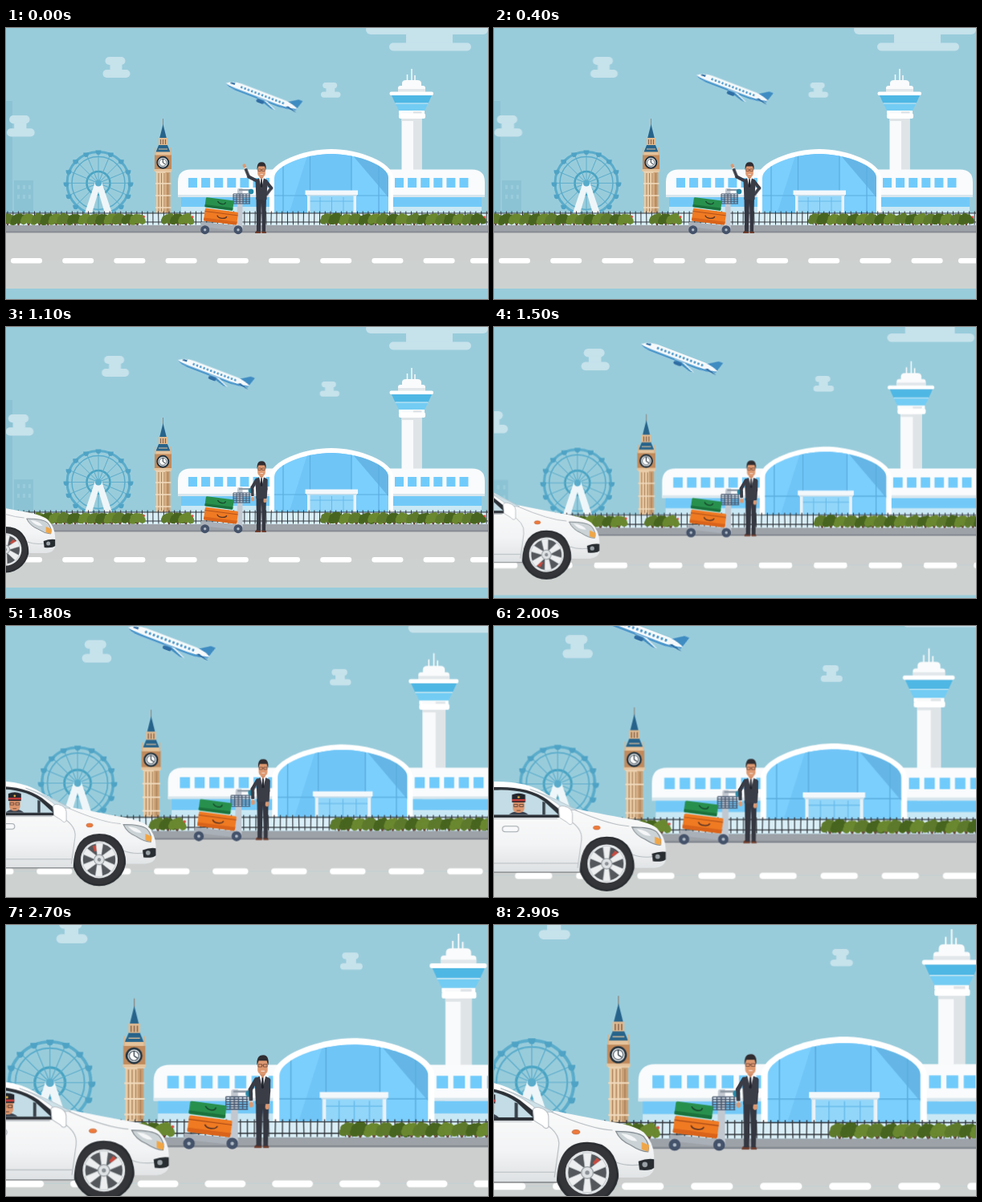
These frames come from a looping animation (600x338 px, 3000 ms). An HTML page:

```html
<!DOCTYPE html>
<html lang="en">
<head>
<meta charset="utf-8">
<title>Airport pickup</title>
<style>
@property --x { syntax: "<number>"; inherits: true; initial-value: 0; }
html, body { margin: 0; width: 100%; height: 100%; overflow: hidden; background: #99ccdb; }
svg { display: block; width: 600px; height: 338px; }
#cam, #plane, #car, .drift, .upper, .fore { animation: 3s linear infinite; }

#cam { animation-name: zoom; }
@keyframes zoom {
  0%, 40% { transform: translate(0, 0) scale(1); }
  43.33% { transform: translate(-4.4px, -2.7px) scale(1.015); }
  50% { transform: translate(-18.6px, -11.6px) scale(1.065); }
  66.67% { transform: translate(-57px, -32.4px) scale(1.185); }
  80% { transform: translate(-77.6px, -45px) scale(1.25); }
  96.67% { transform: translate(-107px, -63px) scale(1.34); }
  100% { transform: translate(-113px, -67px) scale(1.358); }
}

#plane { animation-name: fly; }
@keyframes fly {
  40% { transform: translate(-65px, -30px); }
  100% { transform: translate(-180px, -78px); }
}

/* Clouds are far away, so they grow less than the rest. */
.drift { animation-name: drift; transform-box: fill-box; transform-origin: center; }
@keyframes drift {
  40% { transform: translateX(-1.5px) scale(1); }
  100% { transform: translateX(-1.5px) scale(.85); }
}

#car { animation-name: drive; transform: translateX(calc(var(--x) * 1px)); }
#wheel { transform: translate(166.5px, 277.5px) rotate(calc(var(--x) * 2.12deg)); }
@keyframes drive {
  0%, 24% { --x: -240; }
  36.67% { --x: -167.5; }
  50% { --x: -88; }
  56.67% { --x: -48; }
  60% { --x: -28; }
  63.33% { --x: -11; }
  66.67%, 100% { --x: 0; }
}

.left .upper { animation-name: raise; }
.left .fore { animation-name: wave; }
.right .upper { animation-name: hip; }
.right .fore { animation-name: bend; }
@keyframes raise {
  0%, 25% { transform: rotate(117deg); }
  34%, 100% { transform: rotate(30deg); }
}
@keyframes wave {
  0%, 13.33% { transform: translateY(11px) rotate(41deg); }
  6.67%, 20%, 25% { transform: translateY(11px) rotate(63deg); }
  34%, 100% { transform: translateY(11px) rotate(-32deg); }
}
@keyframes hip {
  0%, 25% { transform: rotate(-38deg); }
  34%, 100% { transform: rotate(0deg); }
}
@keyframes bend {
  0%, 25% { transform: translateY(11px) rotate(75deg); }
  34%, 100% { transform: translateY(11px) rotate(4deg); }
}
</style>
</head>
<body>
<svg viewBox="0 0 600 338">
<defs>
  <linearGradient id="paint" x2="0" y2="1">
    <stop offset="0" stop-color="#fff"/><stop offset=".7" stop-color="#f3f4f5"/><stop offset="1" stop-color="#dfe2e4"/>
  </linearGradient>
  <clipPath id="hall"><path d="M334 232V187C334 171 374 157 405 157S476 171 476 187V232Z"/></clipPath>
  <clipPath id="pane"><path d="M20 200H51Q83 199 101 212L116 226H20Z"/></clipPath>
</defs>
<g id="cam">
  <path fill="#8cc3d4" d="M0 91H8V230H0ZM10 190H34V230H10Z"/>
  <g id="panes" fill="#99ccdb"></g>

  <g id="clouds" fill="#c6e2eb"></g>

  <g id="plane"><g transform="translate(274 68) rotate(21)">
    <path fill="#3f8cc2" d="M79 -4L92 -12.5H97.5L93 2Z"/>
    <path fill="#f6f9fb" d="M0 1Q7 -5 19 -5.5H78Q89 -4.5 95 -1Q90 4 72 5H14Q4 4.5 0 1Z"/>
    <path fill="#4b97cb" d="M0 1Q6 2.5 20 2.5H70Q86 2 95 -1Q90 4 72 5H14Q4 4.5 0 1Z"/>
    <path fill="#2f6da3" d="M6 -2.5L11 -3.5V-1L5 -.8Z"/>
    <g id="ports" fill="#4b97cb"></g>
    <path fill="#dceaf2" d="M42 3.5H56L70 10H66Z"/>
    <path fill="#3f8cc2" d="M42 4H52L68 10.5L64 10.5Z"/>
    <rect fill="#2f6da3" x="43" y="5" width="10" height="4" rx="2"/>
    <path fill="#2f6da3" d="M83 0L95 3.5H91L80 1.5Z"/>
  </g></g>

  <g id="ferris" fill="none" stroke="#5aaccb" transform="translate(115 193.5)">
    <circle r="39" stroke-width="3"/>
    <circle r="33" stroke-width="1.5"/>
    <circle r="14.5" stroke="#48a3c2" stroke-width="2.5"/>
  </g>
  <path fill="#eef6f9" d="M111 192H119L132 231H123L115 204L107 231H98Z"/>
  <circle cx="115" cy="193.5" r="4" fill="#5aaccb"/>

  <g id="clocktower">
    <path stroke="#8a7a6c" stroke-width=".8" d="M195.5 113V122"/>
    <path fill="#27638a" d="M195.5 120L200 138H191ZM190.5 145H200.5L205 156H186Z"/>
    <path fill="#e0bb92" d="M190 137H201V146H190Z"/>
    <path stroke="#87644c" stroke-width="1.2" d="M192.5 139V145M195.5 139V145M198.5 139V145"/>
    <path fill="#e8cba5" d="M187 176H204.5V232H187Z"/>
    <path fill="#c99f73" d="M198.5 176H204.5V232H198.5Z"/>
    <path stroke="#a97f59" d="M190 181V229M193.5 181V229M197 181V229M201.5 181V229"/>
    <path stroke="#f2dcc0" stroke-width="1.5" d="M186 179H205.5M186 194H205.5M186 209H205.5M186 224H205.5"/>
    <path fill="#c08a5c" d="M185 158H206V177H185Z"/>
    <path fill="#e5c39b" d="M185.5 154.5H205.5V158.5H185.5ZM184.5 176H206.5V179H184.5Z"/>
    <path stroke="#e5c39b" d="M190 151H201"/>
    <path stroke="#d9b38a" stroke-width="1.3" d="M186 149V158M205 149V158"/>
    <circle cx="195.3" cy="167.8" r="7" fill="#fff" stroke="#22333f" stroke-width="2"/>
    <circle cx="195.3" cy="167.8" r="4.6" fill="none" stroke="#40505b" stroke-width=".9"/>
    <path stroke="#26333d" d="M195.3 168V163M195.3 168L198.5 170" fill="none"/>
  </g>

  <g id="control">
    <path stroke="#f7f9fa" stroke-width="1.5" d="M505 51V68M499.5 58V68M509 59V68"/>
    <path fill="#fafbfc" d="M493 72V69Q493 65 498 65H512Q517 65 517 69V72ZM488 79V75Q488 72 491 72H519Q522 72 522 75V79Z"/>
    <path fill="#e1e7ea" d="M488 76H522V80H488Z"/>
    <rect fill="#fff" x="477.5" y="79.5" width="54.5" height="4.5" rx="2"/>
    <path fill="#4fb7e4" d="M480 84H530L525.5 94H484.5Z"/>
    <path fill="#73ccf3" d="M484.5 94H525.5L521 103H489Z"/>
    <path stroke="#d9eef6" d="M484.5 94H525.5"/>
    <path fill="#fff" d="M489 103H521V107H489Z"/>
    <path fill="#f9fafb" d="M492.5 104H517.5V232H492.5Z"/>
    <path fill="#dfe4e7" d="M507 104H517.5V232H507ZM492.5 113H517.5V116H492.5Z"/>
    <rect fill="#fff" x="489" y="106.5" width="33" height="6.5" rx="2"/>
  </g>

  <path fill="#f9fbfc" d="M214 211V192Q214 176.5 230 176.5H340V211ZM596 211V192Q596 176.5 580 176.5H470V211Z"/>
  <path fill="#72c9f8" d="M218 211H335V224H218ZM475 211H592V224H475Z"/>
  <path fill="#c9e8f5" d="M218 223H335V232H218ZM475 223H592V232H475Z"/>
  <path fill="#d8e6ed" d="M214 208H335V211H214ZM475 208H596V211H475Z"/>
  <g id="wings" fill="#70cbfb"></g>

  <path fill="#fff" d="M328 232V187C328 167 372 151 405 151S482 167 482 187V232Z"/>
  <g clip-path="url(#hall)">
    <path fill="#7bcffd" d="M330 150H480V232H330Z"/>
    <path fill="#70c5f7" d="M378 150H430V232H352Z"/>
    <path fill="#5fb1e2" d="M424 150L480 216V150Z" opacity=".8"/>
    <path stroke="#5aaedf" stroke-width="1.2" d="M345 150V232M378.5 150V232M430 150V232M464 150V232M330 209H480"/>
  </g>
  <path fill="#92d6fa" d="M378 209H433V232H378Z"/>
  <path stroke="#66baea" d="M391 211V232M405.5 211V232M420 211V232M378 216H433"/>
  <path fill="#e9f2f7" d="M375 207H378.5V232H375ZM432.5 207H436V232H432.5Z"/>
  <path fill="#c8dde9" d="M374 207H437V209.5H374Z"/>
  <path fill="#f3f8fb" d="M372.5 202.5H438V208H372.5Z"/>
  <path fill="#d9eef6" d="M0 231H600V246H0Z"/>

  <path id="fence" fill="none" stroke="#30343a" stroke-width="1"/>
  <path fill="#9da2a8" d="M0 246H600V256H0Z"/>
  <g id="hedge"></g>
  <path fill="#858a92" d="M0 253.5H600V255.5H0Z"/>
  <path fill="#cdcfcf" d="M0 255.5H600V290H0Z"/>
  <path fill="#cdd2d0" d="M0 290H600V325H0Z"/>
  <g id="dashes" fill="#fff"></g>

  <g id="trolley">
    <path fill="#aab0b8" d="M243 242L295 247V253H289L243 248Z"/>
    <path fill="#c2c8d0" d="M288 202Q288 200 290 200H294.5V252H287.5Z"/>
    <g id="basket" fill="none" stroke="#45556d" stroke-width="1"></g>
    <path stroke="#8e98a3" stroke-width="2" d="M290 202H304"/>
    <circle cx="305" cy="204" r="3.3" fill="#2589a8"/>
    <g transform="translate(248 224.5) rotate(7.5)">
      <rect fill="#ef7a22" width="41.5" height="16" rx="1.5"/>
      <path fill="#d9631a" d="M0 12H41.5V15Q41.5 16 40 16H1Q0 16 0 15Z"/>
      <path fill="none" stroke="#583326" stroke-width="1.3" d="M16 7Q17 10 22 10T28 7"/>
      <path stroke="#a94b19" stroke-width=".8" d="M0 4H41.5"/>
    </g>
    <g transform="translate(249 211) rotate(7.5)">
      <rect fill="#28904d" width="35" height="12.5" rx="1.5"/>
      <path fill="#1b713c" d="M0 9H35V12H0Z"/>
      <path fill="none" stroke="#17462c" stroke-width="1.2" d="M15 3Q17 6 21 6T25 3"/>
    </g>
    <g fill="#aebac6" stroke="#44526a" stroke-width="3.8">
      <circle cx="247.7" cy="251.7" r="3.6"/><circle cx="289" cy="251.7" r="3.6"/>
    </g>
  </g>

  <g id="man">
    <path fill="#6e3c2c" d="M310 256Q310 253 313 252.500H317V256ZM318.500 253H321.500Q324 253 324 256H318.500Z"/>
    <path fill="#343640" d="M311.500 211H324L323 254H318.800L318 218L316.800 254H312Z"/>
    <g class="right" transform="translate(323.500 191)"></g>
    <path fill="#3a3c46" d="M310.500 190.500Q312 188.500 315 187.500H321Q324 188.500 325.500 190.500L324.500 214H311.500Z"/>
    <path fill="#fff" d="M315 186.500H321L318 200Z"/>
    <path fill="#20222b" d="M317.300 188H318.700L319.200 198L318 200L316.800 198Z"/>
    <path fill="#d08a64" d="M315.500 182H320.500V186L318 189L315.500 186Z"/>
    <rect fill="#dd9870" x="313.200" y="169.500" width="9.600" height="16.500" rx="4.500"/>
    <path fill="#302d31" d="M312.700 177Q312 169 316 167.500Q322 166 323.200 171Q324 174 323.200 177L322 172.500H314.300Z"/>
    <path fill="none" stroke="#6b4438" stroke-width=".6" d="M313.800 176H317.300V178.500H313.800ZM318.800 176H322.300V178.500H318.800ZM317.300 177H318.800"/>
    <path stroke="#f7e9e2" stroke-width=".8" d="M316.500 182.500H320"/>
    <g class="left" transform="translate(312 190.500)"></g>
  </g>

  <g id="car">
    <path fill="#30363b" d="M20 282H140V287H20Z" opacity=".5"/>
    <circle cx="166.500" cy="277" r="29.500" fill="#2a2d31"/>
    <path fill="url(#paint)" d="M20 191H50Q84 191 103 204L131 219Q150 223 182 229Q210 233 219 240Q228 249 228.500 262V274Q227 281 217 282H196Q194 249 166.500 249Q139 249 138 286H20Z"/>
    <path fill="#cfe2ea" stroke="#a8b7bf" stroke-width=".6" d="M86 199Q105 205 135 221L122 221Q110 208 86 199Z"/>
    <path fill="#2c3137" d="M20 197H50Q84 196 104 210L124 226Q123 229 116 229H20Z"/>
    <path fill="#c3dce5" d="M20 200H51Q83 199 101 212L116 226H20Z"/>
    <path fill="#39424a" d="M99 226V212L102 213V226Z"/>
    <g id="driver" clip-path="url(#pane)">
      <path fill="#39414e" d="M62 229Q64 223 74 222Q84 223 86 229Z"/>
      <rect fill="#dd966e" x="68" y="209" width="12" height="15" rx="5"/>
      <path fill="#23262d" d="M67 205Q74 202 81 205V213H67Z"/>
      <path fill="#c43d3b" d="M67 209.500H81V211.700H67Z"/>
      <circle cx="74" cy="207.500" r="1.200" fill="#e8b74c"/>
      <path fill="none" stroke="#523b31" stroke-width=".7" d="M69 215H73V217.500H69ZM75 215H79V217.500H75ZM72 221.500H76"/>
    </g>
    <path fill="none" stroke="#b7bdc1" stroke-width=".9" d="M122 229Q142 239 140 253L136 282M20 230H115M20 277H136M133 221Q170 237 190 238M194 268Q206 273 228 268"/>
    <path fill="#fff" stroke="#b6bcc0" stroke-width=".8" d="M116 219Q117 216 122 217Q130 219 130.500 225V235Q128 238 125 234L117 229Z"/>
    <rect fill="#f8f9fa" stroke="#9fa6ab" stroke-width=".9" x="57" y="238" width="17" height="6" rx="3"/>
    <ellipse cx="156" cy="239.700" rx="3.600" ry="2" fill="#ee7a3a" stroke="#b65f35" stroke-width=".5"/>
    <path fill="#ccd3d6" stroke="#7f888e" stroke-width=".9" d="M193 239Q213 239 219 244Q225 251 223 258Q216 258 207 252Q197 248 193 239Z"/>
    <path fill="#f0a646" d="M217 249L224 252L223 258L217 256Z"/>
    <path fill="#f4f6f7" d="M198 241Q209 242 213 248Q205 249 198 241Z"/>
    <path fill="#282d32" d="M214 267Q222 264 228.500 265V273Q225 276 215 275Z"/>
    <circle cx="220" cy="270" r="2.500" fill="#9ba3a8"/>
    <g id="wheel">
      <circle r="27" fill="#343538"/>
      <circle r="19" fill="#54585c" stroke="#e4e7e9" stroke-width="2.500"/>
      <path fill="#c74a3f" d="M5 -9L9 -14L13 -10L9 -5Z"/>
      <g id="spokes" fill="#eceeef" stroke="#b9bec2" stroke-width=".5"></g>
      <circle r="5.500" fill="#dfe2e4" stroke="#999fa4"/><circle r="2" fill="#8b9196"/>
    </g>
  </g>
</g>
</svg>
<script>
const $ = id => document.getElementById(id);
const fill = (id, n, part) => {
  $(id).innerHTML += Array.from({ length: n }, (_, i) => part(i)).join("");
};
const rect = (x, y, w, h, r = 0) => `<rect x="${x}" y="${y}" width="${w}" height="${h}" rx="${r}"/>`;
const dot = (x, y, r, c) => `<circle cx="${x}" cy="${y}" r="${r}" fill="${c}"/>`;

// Each arm hangs from its shoulder, the forearm from its elbow.
for (const side of ["left", "right"]) {
  document.querySelector("." + side).innerHTML = `<g class="upper">
    <path d="M0 0V11" stroke="#3a3c46" stroke-width="4" stroke-linecap="round"/>
    <g class="fore">
      <path d="M0 0V10" stroke="#3a3c46" stroke-width="3.6" stroke-linecap="round"/>
      <path d="M0 11V12.5" stroke="#fff" stroke-width="3.2"/>
      <ellipse cy="14.5" rx="2" ry="2.8" fill="#dd9870"/>
    </g></g>`;
}

fill("panes", 6, i => rect(14 + i % 3 * 7, 196 + (i / 3 | 0) * 12, 3, 5));
fill("ports", 13, i => rect(19 + i * 4.6, -2.8, 2.4, 2.8, .7));
fill("wings", 13, i => rect(i < 7 ? 227 + i * 16.1 : 484 + (i - 7) * 16.1, 187, 11, 12));
fill("dashes", 10, i => rect(i < 9 ? 6 + i * 64.2 : 578, 287, 39, 6.5, 3.2));
fill("basket", 6, i => `<path d="M${283 + i * 4} 207V219M283 ${207 + i * 2.4}H304"/>`);
fill("spokes", 6, i => `<path transform="rotate(${i * 60})" d="M-2 -3L-4 -18.5H4L2 -3Z"/>`);
fill("ferris", 16, i => `<path transform="rotate(${i * 22.5})" d="M0 0V-39" stroke-width=".9"/>`);
fill("ferris", 16, i => {
  const a = i * Math.PI / 8, x = 40 * Math.cos(a), y = 40 * Math.sin(a);
  return `<path fill="#4fa3c5" stroke="none" d="M${x - 3.5} ${y - 1}h7q0 5.500 -3.500 5.500t-3.500 -5.500z"/>`;
});

const cloud = (x, y, k) => `<g class="drift"><g transform="translate(${x} ${y}) scale(${k})">
  ${rect(3, 0, 25, 10, 5)}${rect(9, 8, 15, 10)}${rect(0, 16, 34, 10, 5)}</g></g>`;
$("clouds").innerHTML = cloud(120.5, 36, 1) + cloud(392, 68, .72) + cloud(1, 109, 1.02)
  + rect(448, -4, 152, 12, 6) + rect(498, 6, 58, 15) + rect(477, 18.5, 102, 10, 5);

let seed = 7;
const rnd = () => (seed = seed * 16807 % 2147483647) / 2147483647;

let rails = "M0 231H600M0 242H600";
for (let x = 2; x < 600; x += 6.7) rails += `M${x} 228.5l${rnd() - .5} 17`;
$("fence").setAttribute("d", rails);

// A hedge is a row of round bushes, light and dark in turn.
const greens = ["#5d7a2c", "#48651f", "#6a882f"];
const bush = (x, c) => {
  let s = `<path stroke="#674532" stroke-width="1.5" d="M${x} 246l-3 -6M${x} 246l3 -7"/>`;
  for (let i = 0; i < 6; i++) {
    const a = Math.PI * (1 + i / 5);
    s += dot(x + 6 * Math.cos(a), 240.5 + 6 * Math.sin(a) + rnd() * 1.5, 4, c);
  }
  s += dot(x, 239, 5, c);
  if (rnd() < .4) s += dot(x + 8, 235 + rnd() * 3, 1.4, "#d9504a");
  return s;
};
const hedge = (from, to) => {
  let s = "";
  for (let x = from, i = 0; x < to; x += 10 + rnd() * 4) s += bush(x, greens[i++ % 3]);
  return s;
};
$("hedge").innerHTML = hedge(2, 170) + hedge(203, 226) + hedge(401, 600);
</script>
</body>
</html>
```
